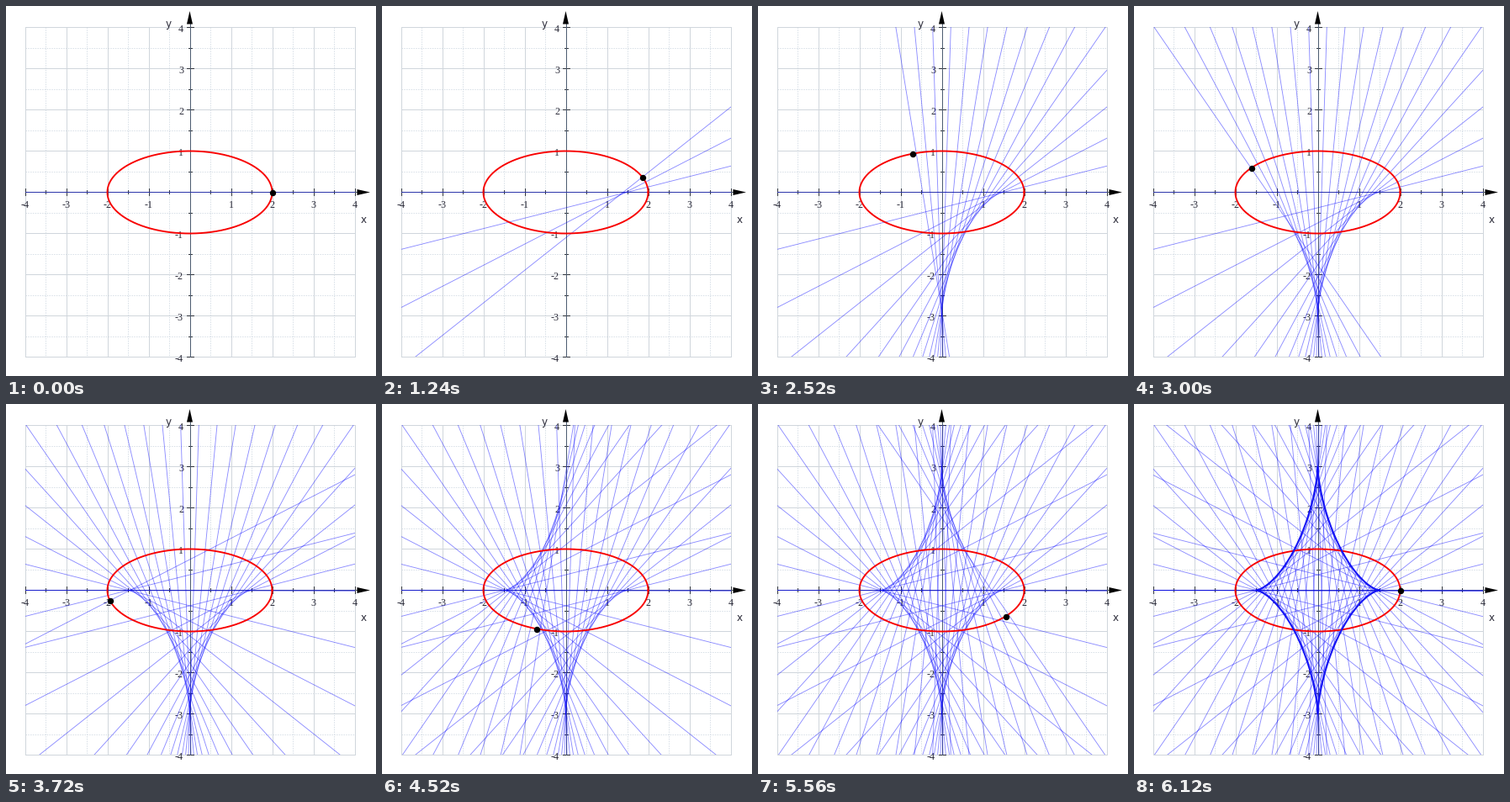
A matplotlib script that plays this animation: 440 px wide and 440 px high, repeating every 8.12 s.

```python
import numpy as np
import matplotlib.pyplot as plt
from matplotlib.animation import FuncAnimation
from matplotlib.collections import LineCollection
from matplotlib.patches import Polygon, Rectangle

SIZE, DPI = 440, 100
PX = 72 / DPI                # one pixel in points
CX, CY, UNIT = 218.5, 221.5, 49
A, B = 2, 1                  # ellipse half axes
STEPS, NORMALS = 65, 50
TICK_MS, LOOP_MS = 40, 8120
HOLD_TICKS = 1000 // TICK_MS
AXIS = "#4c5c70"
INK = "#1c2028"


def to_px(x, y):
    return CX + UNIT * np.asarray(x), CY - UNIT * np.asarray(y)


def ellipse(t):
    return A * np.cos(t), B * np.sin(t)


def normal(n):
    """Pixel end points of the n-th normal, long enough to cross the grid."""
    t = 2 * np.pi * n / NORMALS
    p = np.array(ellipse(t))
    d = np.array([B * np.cos(t), A * np.sin(t)])
    d *= 14 / np.hypot(*d)
    return [to_px(*(p - d)), to_px(*(p + d))]


fig = plt.figure(figsize=(SIZE / DPI, SIZE / DPI), dpi=DPI, facecolor="white")
ax = fig.add_axes([0, 0, 1, 1])
ax.set_xlim(0, SIZE)
ax.set_ylim(SIZE, 0)
ax.axis("off")


def stroke(xs, ys, color, width=1, z=1, **kw):
    return ax.plot(xs, ys, color=color, lw=width * PX, zorder=z, **kw)[0]


def label(x, y, s, font, size, **kw):
    ax.text(x, y, s, family=font, fontsize=size * PX, color="#2c2c3a",
            va="center_baseline", zorder=3, **kw)


def draw_grid():
    x0, y0 = to_px(-4, 4)
    x1, y1 = to_px(4, -4)
    for i in range(-8, 9):
        gx, gy = to_px(i / 2, i / 2)
        major = i % 2 == 0
        style = (dict(color="#d0d6dc", z=1) if major else
                 dict(color="#d6dee6", z=0.5, ls=(0, (1.4, 1.4))))
        stroke([gx, gx], [y0, y1], **style)
        stroke([x0, x1], [gy, gy], **style)
        if i == 0:
            continue
        r = 4 if major else 2
        stroke([gx, gx], [CY - r, CY + r], INK, 0.9, 2)
        stroke([CX - r, CX + r], [gy, gy], INK, 0.9, 2)
        if major:
            s = str(i // 2)
            label(gx, 235, s, "Liberation Serif", 12, ha="center")
            label(211, gy + 1, s, "Liberation Serif", 12, ha="right")


def draw_axes():
    stroke([22.5, 420], [CY, CY], AXIS, 1, 2)
    stroke([CX, CX], [417.5, 18], AXIS, 1, 2)
    for tip in ([(433, CY), (417.5, CY - 3.5), (417.5, CY + 3.5)],
                [(CX, 6), (CX - 3.5, 21.5), (CX + 3.5, 21.5)]):
        ax.add_patch(Polygon(tip, fc="black", ec="none", zorder=2))
    label(425, 253, "x", "DejaVu Sans", 12, ha="center")
    label(193.5, 20.5, "y", "DejaVu Sans", 12, ha="center")


draw_grid()
draw_axes()

turn = np.linspace(0, 2 * np.pi, 400)
stroke(*to_px(*ellipse(turn)), "#f80000", 1.9, 5)

segments = [normal(n) for n in range(NORMALS + 1)]
normals = LineCollection([], colors=[(0, 0, 1, 0.45)], linewidths=0.9 * PX, zorder=4)
ax.add_collection(normals, autolim=False)
normals.set_clip_path(Rectangle(to_px(-4, 4), 8 * UNIT, 8 * UNIT,
                                transform=ax.transData))

focal = A * A - B * B
evolute = stroke(*to_px(focal / A * np.cos(turn) ** 3, -focal / B * np.sin(turn) ** 3),
                 "#1414f5", 2, 6)
dot, = ax.plot([], [], "o", color="black", ms=7.4 * PX, mew=0, zorder=7)


def update(i):
    k = min(max((i - HOLD_TICKS) // 2 + 1, 0), STEPS)
    x, y = to_px(*ellipse(2 * np.pi * k / STEPS))
    dot.set_data([x + 0.5], [y + 0.5])
    normals.set_segments(segments[:round(k * NORMALS / STEPS) + 1])
    evolute.set_visible(k == STEPS)
    return normals, evolute, dot


anim = FuncAnimation(fig, update, frames=LOOP_MS // TICK_MS, interval=TICK_MS,
                     init_func=lambda: update(0), repeat=True)
plt.show()
```
